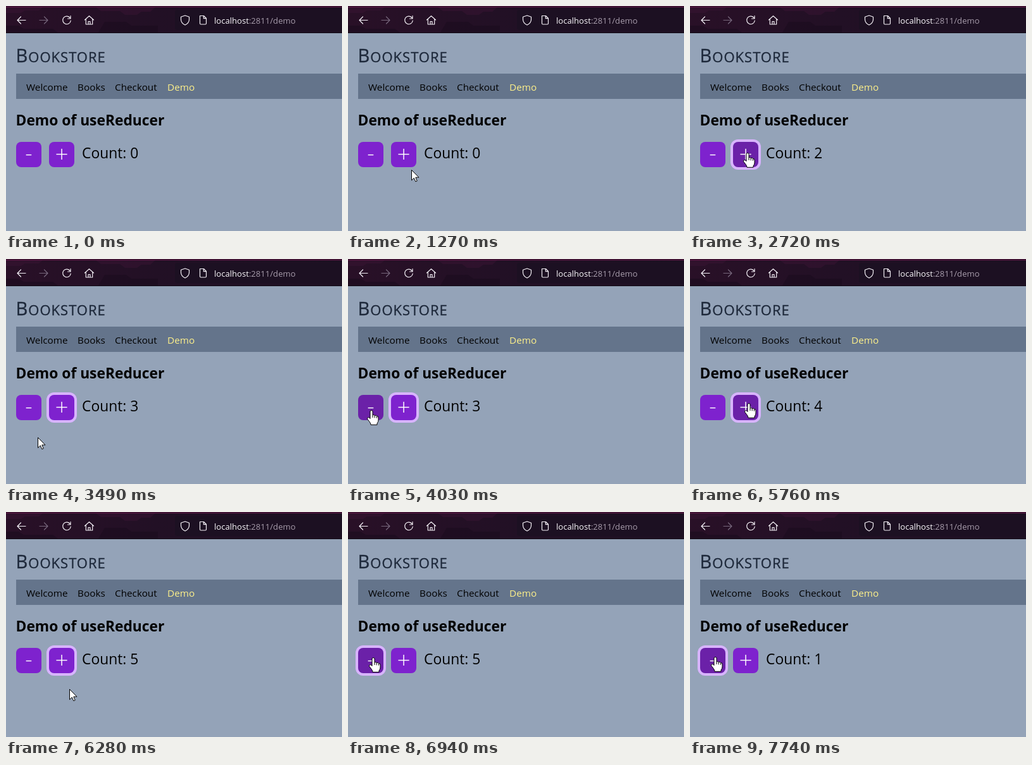
Write an HTML page that moves like this. It is 531 px wide and 356 px high and loops after 8000 ms.

```html
<!DOCTYPE html>
<html lang="en">
<head>
<meta charset="utf-8">
<title>Bookstore demo</title>
<style>
  html, body { margin: 0; width: 100%; height: 100%; overflow: hidden; background: #94a3b8; }
  svg { display: block; width: 100vw; height: 100vh; }
  text { font-family: "Open Sans", "Noto Sans", sans-serif; white-space: pre; }
  .icon { fill: none; stroke: #f3eff5; stroke-width: 1.2; stroke-linecap: round; stroke-linejoin: round; }
  .dim { stroke: #77677c; }
  .url { font-size: 13.1px; fill: #fbf9fc; }
  .path { fill: #a79cab; }
  .brand { font-size: 29px; fill: #1e293b; stroke: #1e293b; stroke-width: .35px; letter-spacing: 1px; }
  .caps { font-size: 22px; }
  .nav { font-size: 15.3px; }
  .active { fill: #fef08a; }
  .title { font-size: 22.8px; font-weight: 700; }
  .count { font-size: 22.8px; }
  .button { --fill: #7e22ce; }
  .button.hover { --fill: #6b21a8; }
  .button rect { fill: var(--fill); }
  .button text { font-size: 37px; font-weight: 300; fill: #fff; text-anchor: middle; }
  .button .ring { fill: #d8b4fe; visibility: hidden; }
  .button.focus .ring { visibility: visible; }
  .cursor { fill: #fff; stroke: #000; stroke-width: 1; stroke-linejoin: round; }
</style>
</head>
<body>
<svg viewBox="0 0 531 356">
  <defs>
    <linearGradient id="bar">
      <stop offset="0" stop-color="#291027"/>
      <stop offset=".45" stop-color="#221025"/>
      <stop offset="1" stop-color="#1d1022"/>
    </linearGradient>
  </defs>

  <rect width="531" height="356" fill="#94a3b8"/>
  <rect width="531" height="43" fill="url(#bar)"/>
  <path fill="#3a1434" opacity=".5" d="M0 2H58L52 7H30L24 11H0ZM142 2H236L228 9H214L207 14H188L180 8H150Z"/>
  <path fill="#190b1c" opacity=".5" d="M0 31H20L28 36H74L82 42H0ZM156 25H190L198 31H240V42H146Z"/>
  <rect width="531" height="1" fill="#1c0e1e"/>
  <rect y="1" width="531" height="1" fill="#701a50"/>
  <rect x="267" y="6" width="270" height="32" rx="4" fill="#1c1022"/>
  <rect y="42" width="531" height="1" fill="#120b16"/>

  <g class="icon">
    <path d="M31 22.5H18M23.5 17 18 22.5 23.5 28"/>
    <path class="dim" d="M53 22.5H66M60.5 17 66 22.5 60.5 28"/>
    <path d="M101.2 18.8A6.3 6.3 0 1 0 102.3 23M102 15.5V20H97.5"/>
    <path d="M124.5 22 131.5 15.8 138.5 22M126.3 20.8V29H136.7V20.8M130 29V24.5H133V29"/>
    <path d="M283 15 289.5 17.3V21.5Q289.3 27 283 30 276.7 27 276.5 21.5V17.3Z"/>
    <path d="M306.5 15.5H312.5L316.5 19.5V27.5Q316.5 29 315 29H308Q306.5 29 306.5 27.5ZM312.3 15.8V19.7H316.2"/>
  </g>
  <text class="url" x="329" y="28">localhost<tspan class="path">:2811/demo</tspan></text>

  <text class="brand" x="15.5" y="89">B<tspan class="caps">OOKSTORE</tspan></text>
  <rect x="16" y="107" width="515" height="40" fill="#64748b"/>
  <g class="nav">
    <text x="32" y="134">Welcome</text>
    <text x="113" y="134">Books</text>
    <text x="172" y="134">Checkout</text>
    <text class="active" x="255" y="134">Demo</text>
  </g>
  <text class="title" x="15.5" y="189">Demo of useReducer</text>

  <g class="button" id="minus">
    <rect class="ring" x="12" y="211" width="48" height="48" rx="12"/>
    <rect x="16" y="215" width="40" height="40" rx="8"/>
    <text x="36" y="245.5">-</text>
  </g>
  <g class="button" id="plus">
    <rect class="ring" x="64" y="211" width="48" height="48" rx="12"/>
    <rect x="68" y="215" width="40" height="40" rx="8"/>
    <text x="88" y="248">+</text>
  </g>
  <text class="count" x="120" y="241">Count: <tspan id="value">0</tspan></text>

  <g class="cursor" id="cursor">
    <path id="arrow" d="M.5 .5V16.8L4.3 13.2 6.8 18.8 9.2 17.8 6.8 12.2H12Z"/>
    <g id="hand">
      <path d="M-2 1.6Q0 -.8 2 1.6V8Q4 6.8 5.2 8.6 7.4 7.6 8.4 9.6 11 9 11 12V16Q11 18.5 9 21V23.3H-1Q-1 21 -3 18.5L-6.3 14.3Q-7 11.8 -4.6 11.6 -3.2 12 -2 13.6Z"/>
      <path fill="none" d="M2 8V12M5.2 8.8V12.4M8.4 9.8V12.8"/>
    </g>
  </g>
</svg>
<script>
  const LOOP = 8000;
  const STEP = 135; // the pointer moves in visible steps

  const entry = [150, 306], onPlus = [91, 232], onMinus = [37, 238], below = [100, 280];

  // Each trip is a curve from one resting point to the next, pulled towards bend.
  const trips = [
    { start: 1000, steps: 6, from: entry, bend: [100, 281], to: onPlus },
    { start: 3205, steps: 7, from: onPlus, bend: [50, 335], to: onMinus },
    { start: 4625, steps: 2, from: onMinus, bend: [66, 238], to: [93, 228] },
    { start: 5845, steps: 3, from: [93, 228], bend: [97, 245], to: below },
    { start: 6280, steps: 5, from: below, bend: [55, 290], to: [40, 229] }
  ];

  // A button takes focus at "down"; every click then changes the count.
  const rounds = [
    { id: "plus", down: 2150, clicks: [2150, 2720, 3030] },
    { id: "minus", down: 4330, clicks: [4480, 4620] },
    { id: "plus", down: 5210, clicks: [5210, 5520, 5670, 5820] },
    { id: "minus", down: 6920, clicks: [7050, 7300, 7610, 7740] }
  ];

  const el = id => document.getElementById(id);
  const [value, cursor, arrow, hand] = ["value", "cursor", "arrow", "hand"].map(el);
  const buttons = [{ id: "minus", x: 16 }, { id: "plus", x: 68 }];
  const show = (node, on) => node.setAttribute("display", on ? "inline" : "none");
  const easeOut = k => 1 - (1 - k) ** 3;

  function pointerAt(t) {
    const trip = trips.filter(({ start }) => start <= t).pop();
    if (!trip) return null;
    const step = Math.min(trip.steps, Math.floor((t - trip.start) / STEP));
    const p = easeOut(step / trip.steps), q = 1 - p;
    return [0, 1].map(i =>
      Math.round(q * q * trip.from[i] + 2 * p * q * trip.bend[i] + p * p * trip.to[i]));
  }

  function countAt(t) {
    return rounds.reduce((sum, { id, clicks }) =>
      sum + (id === "plus" ? 1 : -1) * clicks.filter(c => c <= t).length, 0);
  }

  function render(t) {
    const pointer = pointerAt(t);
    const [x, y] = pointer || [0, 0];
    const focused = rounds.filter(({ down }) => down <= t).pop();
    let over = false;
    for (const b of buttons) {
      const hit = x >= b.x && x < b.x + 40 && y >= 215 && y < 255;
      el(b.id).classList.toggle("hover", hit);
      el(b.id).classList.toggle("focus", focused?.id === b.id);
      over ||= hit;
    }
    value.textContent = countAt(t);
    cursor.setAttribute("transform", `translate(${x} ${y})`);
    show(cursor, pointer);
    show(hand, over);
    show(arrow, !over);
  }

  const start = performance.now();
  function tick() {
    render((performance.now() - start) % LOOP);
    requestAnimationFrame(tick);
  }
  tick();
</script>
</body>
</html>
```
